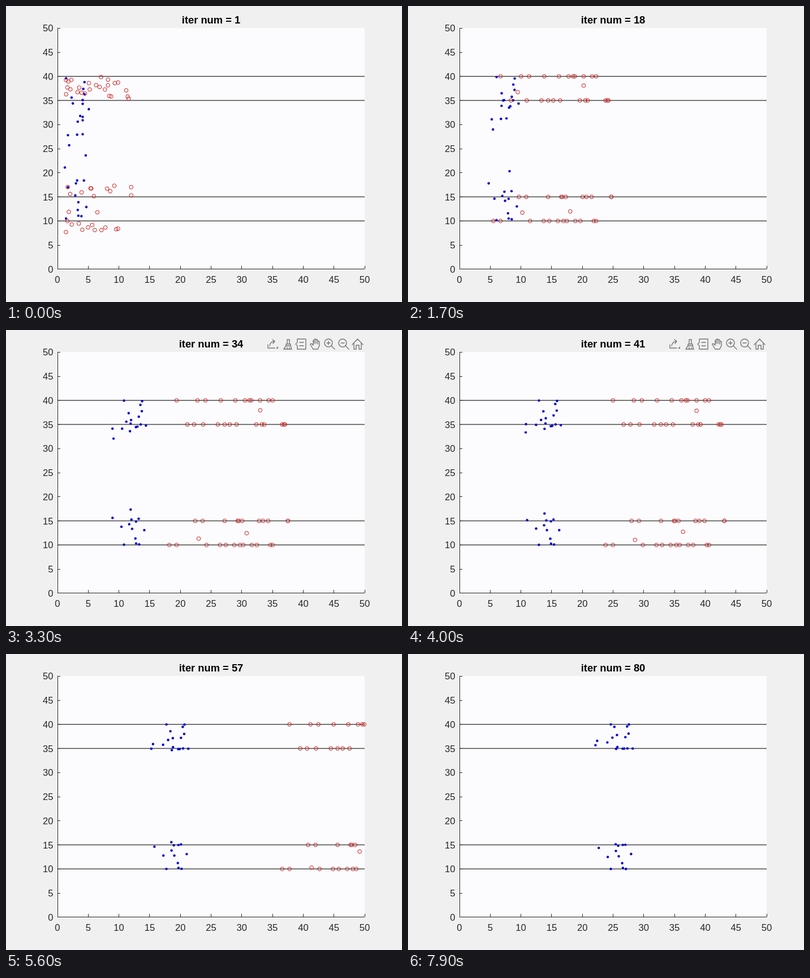
An HTML page that plays this animation: 700 by 525 pixels, repeating every 8000 ms.

```html
<!DOCTYPE html>
<html lang="en">
<head>
<meta charset="utf-8">
<title>Agents in two lanes</title>
<style>
  html, body { margin: 0; width: 100%; height: 100%; overflow: hidden; background: #f0f0f0; }
  svg { display: block; width: 700px; height: 525px; }
  text { font: 16.67px "Liberation Sans", Arial, sans-serif; fill: #262626; }
  #title { font-size: 18.33px; font-weight: bold; fill: #000; text-anchor: middle; }
  #axes { stroke: #262626; fill: none; }
  #lanes { stroke: #4a4a4a; stroke-width: 1.5; fill: none; }
  .walker { fill: #0000d0; }
  .runner { fill: none; stroke: #cc1818; }
  #tools { fill: none; stroke: #757575; stroke-width: 1.4; stroke-linejoin: round; stroke-linecap: round; }
</style>
</head>
<body>
<svg viewBox="0 0 700 525">
  <rect x="91" y="39" width="543" height="428" fill="#fcfcfe"/>
  <path id="lanes"/>
  <path id="axes"/>
  <g id="labels"></g>
  <g id="dots"></g>
  <text id="title" x="362.5" y="31"></text>
  <g id="tools">
    <path d="M463 26V32H475M466 28Q467 21 474 20M471 17L475 20L472 24"/>
    <path d="M477 33H481V29Z" fill="#757575" stroke="none"/>
    <path d="M497 25V17H501V25M495 25H503V28H495ZM495 28L491 34H505L503 28M497 31V34M501 31V34"/>
    <path d="M515 16H530V34H515V28L512 25L515 22ZM519 22H526M519 28H526"/>
    <path d="M543 34L538 26Q538 23 541 25L543 27V19Q544 17 545 19V24V17Q547 15 548 17V24V18Q550 16 551 18V25V21Q553 19 554 21V28L551 34Z"/>
    <path d="M575 28L581 34M567 23H573M570 20V26"/><circle cx="570" cy="23" r="7"/>
    <path d="M600 28L606 34M592 23H598"/><circle cx="595" cy="23" r="7"/>
    <path d="M612 26L621.5 16L631 26M615 24V34H619V27H624V34H628V24"/>
  </g>
</svg>
<script>
const NS = "http://www.w3.org/2000/svg";
const UX = 10.86, UY = 8.55, STEPS = 80;
const $ = id => document.getElementById(id);
const px = x => 91 + x * UX;
const py = y => 466.8 - y * UY;
const clamp = (v, lo, hi) => Math.max(lo, Math.min(hi, v));

function add(parent, tag, attrs, text) {
  const el = document.createElementNS(NS, tag);
  for (const key in attrs) el.setAttribute(key, attrs[key]);
  if (text !== undefined) el.textContent = text;
  return parent.appendChild(el);
}

let seed = 7;
function random() {
  seed = seed * 16807 % 2147483647;
  return seed / 2147483647;
}

let ticks = "M91.5 39V466.5H634";
for (let v = 0; v <= 50; v += 5) {
  ticks += `M${Math.floor(px(v)) + 0.5} 466v-5M91 ${Math.floor(py(v)) + 0.5}h5`;
  add($("labels"), "text", { x: px(v), y: 491, "text-anchor": "middle" }, v);
  add($("labels"), "text", { x: 83.5, y: py(v) + 6, "text-anchor": "end" }, v);
}
$("axes").setAttribute("d", ticks);
$("lanes").setAttribute("d", [10, 15, 35, 40].map(y => `M92 ${py(y)}H634`).join(""));

// Walkers: start x, start y, y to settle at.
const walkers = [
  [1.4, 39.6, 40], [4.4, 38.8, 40], [4.2, 37.4, 39.6], [4.4, 36.3, 38.1],
  [4.1, 34.3, 37.4], [4.1, 35.1, 35], [5.1, 33.2, 35], [2.3, 35.6, 39.8],
  [3.7, 31.8, 38], [2.5, 34.4, 35.3], [3.3, 30.6, 37.4], [4.1, 31.6, 35],
  [4.1, 30.9, 35], [1.7, 27.8, 36.8], [3.2, 27.9, 36.4], [4.1, 28, 35],
  [1.9, 25.7, 35.9],
  [4.6, 23.6, 15], [1.2, 21.1, 14.3], [3.2, 18.4, 14.8], [3, 17.8, 13.7],
  [2.9, 15.3, 12.6], [3.4, 13.9, 15], [4.3, 18.4, 15], [1.7, 17, 12.4],
  [4.7, 12.9, 13.1], [3.3, 12.3, 11.2], [1.4, 10.5, 10], [3.4, 11.1, 10.2],
  [3.9, 11, 10]
];

// Constant speed: fast sideways between the lanes, slow inside one.
function walk([x, y, goal]) {
  const path = [];
  for (let n = 1; n <= STEPS; n++) {
    path.push([x, y]);
    const limit = y > 15 && y < 35 ? 0.193 : 0.053;
    const dy = clamp(0.06 * (goal - y), -limit, limit);
    x += Math.sqrt(0.3 ** 2 - dy ** 2) * (1 - Math.exp(-n / 2));
    y += dy;
  }
  return n => path[n - 1];
}

// Runners by the wall they follow: where each would start with no delay.
const RUN = 0.8;
const runners = {
  40: [-7.05, -3.64, -2.35, 0.14, 2.53, 4.1, 4.83, 5.11, 6.58, 7.96, 8.61],
  35: [-5.3, -2.72, -0.32, 0.78, 1.61, 2.72, 5.94, 6.86, 7.23, 10.17, 10.45, 10.63],
  15: [-4.01, -2.81, 0.78, 2.9, 3.08, 3.64, 6.4, 7.04, 7.87, 11.1, 11.1],
  10: [-8.24, -7.05, -2.17, 0.04, 0.97, 2.35, 3.27, 3.82, 5.2, 6.03, 8.24, 8.61]
};
// Those that stay between two walls: x, y, sideways drift.
const stragglers = [
  [6.58, 38.15, -0.00018], [-4.19, 37.7, -0.003],
  [-3.45, 11.9, -0.0005], [4.37, 11.8, 0.00056]
];

// The further back, the longer the wait before full pace.
function runX(x, n) {
  const wait = 12.5 * Math.exp(-(x + 8.4) / 7.5);
  const t = n - 1 - wait;
  return x + RUN * (wait + (t + Math.hypot(t, Math.min(wait, 2))) / 2);
}

function runAlong(wall, x) {
  const inward = wall % 10 ? 1 : -1;
  const gap = inward * 2.5 * random();
  return n => [runX(x, n), wall + gap * Math.max(0, 1 - (n - 1) / 10)];
}

function straggle([x, y, drift]) {
  const low = y > 25 ? 35 : 10;
  return n => [runX(x, n), clamp(y + drift * n * n, low, low + 5)];
}

const agents = [];
function addAgent(type, r, at) {
  agents.push({ at, el: add($("dots"), "circle", { class: type, r }) });
}
for (const row of walkers) addAgent("walker", 2.2, walk(row));
for (const wall in runners) {
  for (const x of runners[wall]) addAgent("runner", 3.3, runAlong(+wall, x));
}
for (const row of stragglers) addAgent("runner", 3.3, straggle(row));

let shown = 0;
function draw(n) {
  $("title").textContent = "iter num = " + n;
  $("tools").style.display = n >= 27 && n < 42 ? "" : "none";
  for (const { at, el } of agents) {
    const [x, y] = at(n);
    el.setAttribute("cx", px(x));
    el.setAttribute("cy", py(y));
    el.style.display = x <= 50 ? "" : "none";
  }
}

function tick() {
  const n = Math.floor(performance.now() / 100) % STEPS + 1;
  if (n !== shown) draw(shown = n);
  requestAnimationFrame(tick);
}
tick();
</script>
</body>
</html>
```
